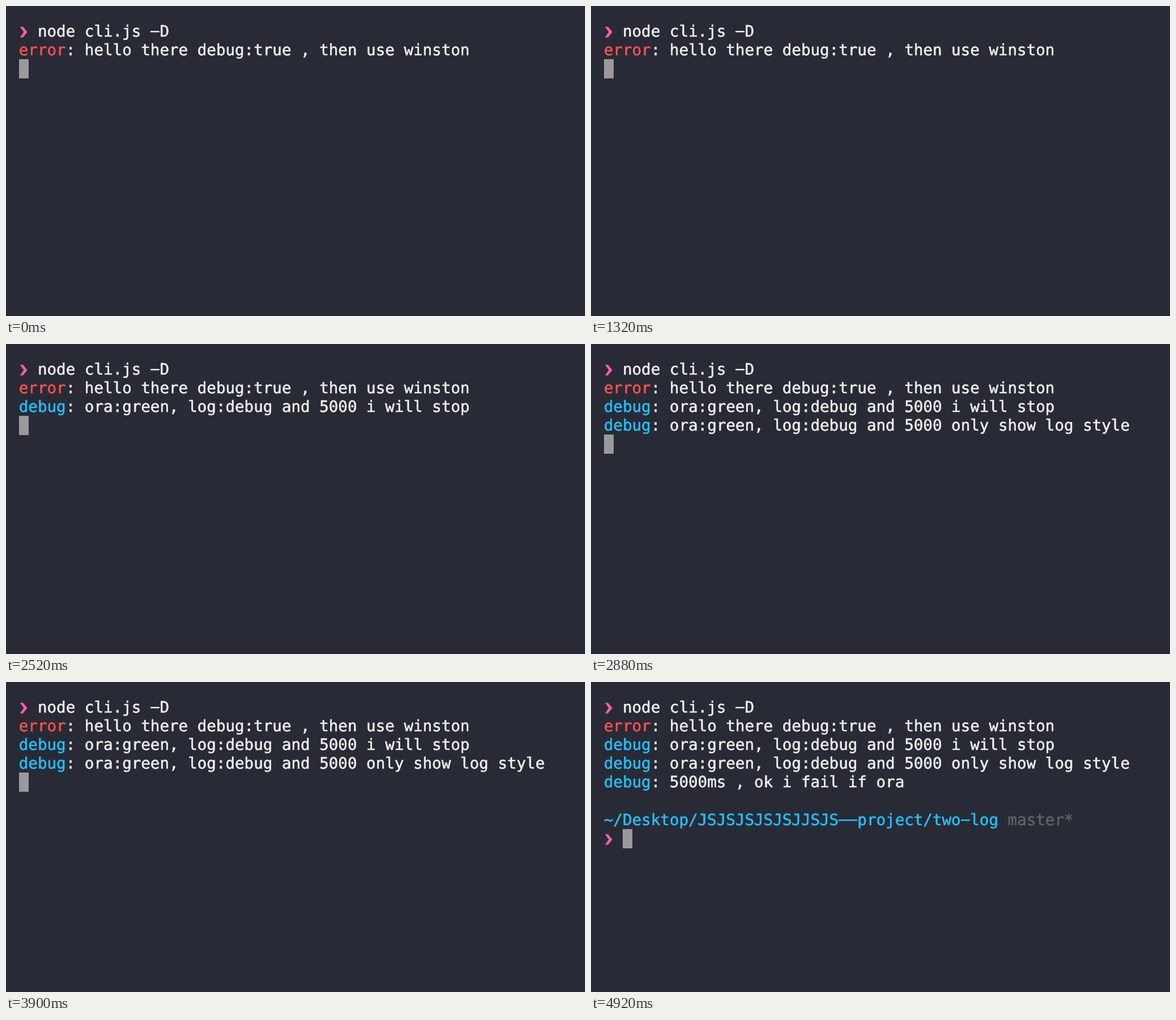
An HTML page that plays this animation: 1022 px wide and 548 px high, repeating every 4.98 s.

```html
<!DOCTYPE html>
<html lang="en">
<head>
<meta charset="utf-8">
<title>Terminal log</title>
<style>
  html, body {
    margin: 0;
    width: 100%;
    height: 100%;
    overflow: hidden;
    background: #282b35;
  }
  :root { --row: 33.2px; --loop: 4980ms step-end infinite; }

  /* The log is revealed row by row through its height. */
  .log {
    position: absolute;
    left: 22.8px;
    top: 28.5px;
    width: 990px;
    overflow: hidden;
    color: #eff0eb;
    font: 27.54px/var(--row) "DejaVu Sans Mono", monospace;
    -webkit-text-stroke: 0.6px currentColor;
    text-rendering: geometricPrecision;
    font-variant-ligatures: none;
    white-space: pre;
    animation: reveal var(--loop);
  }
  .log div { height: var(--row); }
  .error { color: #ff504e; }
  .debug, .path { color: #20c1ff; }
  .branch { color: #606165; }

  /* Hyphens fill the whole cell. */
  .log i {
    display: inline-block;
    height: var(--row);
    vertical-align: top;
    font-style: normal;
    -webkit-text-fill-color: transparent;
    -webkit-text-stroke: 0;
    background: linear-gradient(currentColor, currentColor) 0 15.8px / 100% 2.5px no-repeat;
  }
  .prompt {
    display: inline-block;
    width: 1ch;
    height: var(--row);
    vertical-align: top;
    background: #ff5cab;
    clip-path: polygon(2px 8.2px, 7.2px 8.2px, 14.8px 17.6px, 7.2px 27px, 2px 27px, 8.6px 17.6px);
  }
  .cursor {
    position: absolute;
    left: 23px;
    top: 94px;
    width: 17px;
    height: 34px;
    background: #9b999a;
    animation: move var(--loop);
  }

  /* 1800, 2640, 4440 and 4620 ms */
  @keyframes reveal {
    0%      { height: calc(2 * var(--row)); }
    36.145% { height: calc(3 * var(--row)); }
    53.012% { height: calc(4 * var(--row)); }
    89.157% { height: calc(5 * var(--row)); }
    92.771%, 100% { height: calc(8 * var(--row)); }
  }
  @keyframes move {
    0%      { left: 23px; top: 94px; }
    36.145% { left: 23px; top: 127px; }
    53.012% { left: 23px; top: 160px; }
    89.157% { left: 23px; top: 193px; }
    92.771%, 100% { left: 56px; top: 260px; }
  }
</style>
</head>
<body>
<div class="log"><div><span class="prompt"></span> node cli.js <i>-</i>D</div><div><span class="error">error</span>: hello there debug:true , then use winston</div><div><span class="debug">debug</span>: ora:green, log:debug and 5000 i will stop</div><div><span class="debug">debug</span>: ora:green, log:debug and 5000 only show log style</div><div><span class="debug">debug</span>: 5000ms , ok i fail if ora</div><div></div><div><span class="path">~/Desktop/JSJSJSJSJSJJSJS<i>--</i>project/two<i>-</i>log</span> <span class="branch">master*</span></div><div><span class="prompt"></span></div></div>
<div class="cursor"></div>
</body>
</html>
```
